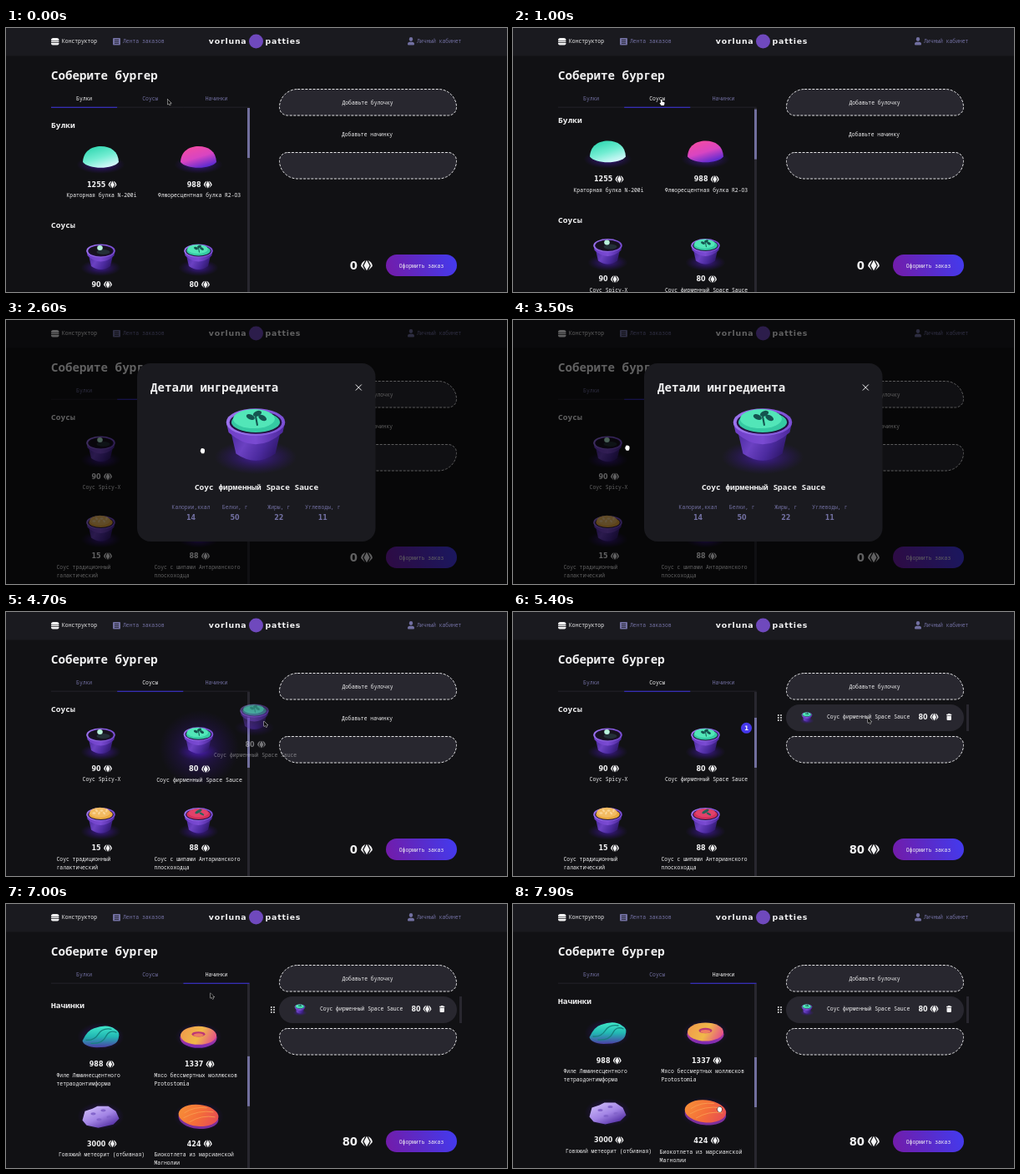
Write an HTML page with a canvas that moves like this. It is 600x317 px and loops after 8000 ms.

```html
<!DOCTYPE html>
<html lang="ru">
<meta charset="utf-8">
<title>Конструктор</title>
<style>
html, body { margin: 0; width: 600px; height: 317px; overflow: hidden; background: #111114 }
canvas { display: block }
</style>
<canvas id="stage" width="600" height="317"></canvas>
<script>
const c = document.getElementById('stage').getContext('2d');
const MONO = '"Noto Sans Mono", "DejaVu Sans Mono", monospace';
const WIDE = '"DejaVu Sans", sans-serif';
const WHITE = '#f2f2f3', MUTED = '#7270a2', PANEL = '#28272f', BLUE = '#4338ea';
const LOOP = 8000, OPEN = 2350, CLOSE = 3600, GRAB = 4350, DROP = 5300;
const TAB_2 = 930, TAB_3 = 6450;

const ease = (t, a, b) => {
  const k = Math.min(1, Math.max(0, (t - a) / (b - a)));
  return k * k * (3 - 2 * k);
};
const isDragging = t => t >= GRAB && t < DROP;
const isModal = t => t >= OPEN && t < CLOSE;
const scrollAt = t => 120 * ease(t, TAB_2, TAB_2 + 500) + 221 * ease(t, TAB_3, TAB_3 + 600);

// Drawing helpers
function text(s, x, y, { size = 6.37, color = WHITE, align = 'left', weight = 500, face = MONO, gap = 0 } = {}) {
  c.font = `${weight} ${size}px ${face}`;
  c.letterSpacing = `${gap}px`;
  c.fillStyle = color;
  c.textAlign = align;
  c.fillText(s, x, y + size * .355);
}
const digits = (s, x, y, o) => text(s, x, y, { size: 8, weight: 700, face: WIDE, ...o });

function fill(d, color) {
  c.fillStyle = color;
  c.fill(new Path2D(d));
}
function line(d, color, width = 1) {
  c.strokeStyle = color;
  c.lineWidth = width;
  c.stroke(new Path2D(d));
}
function oval(x, y, rx, ry, color, turn = 0) {
  c.beginPath();
  c.ellipse(x, y, rx, ry, turn, 0, 7);
  c.fillStyle = color;
  c.fill();
}
function box(x, y, w, h, r, color) {
  c.beginPath();
  c.roundRect(x, y, w, h, r);
  c.fillStyle = color;
  c.fill();
}
function ramp(x0, y0, x1, y1, ...colors) {
  const g = c.createLinearGradient(x0, y0, x1, y1);
  colors.forEach((k, i) => g.addColorStop(i / (colors.length - 1), k));
  return g;
}
function at(x, y, s, paint) {
  c.save();
  c.translate(x, y);
  c.scale(s, s);
  paint();
  c.restore();
}
function glow(y, rx, ry, alpha) {
  c.save();
  c.translate(0, y);
  c.scale(rx, ry);
  const g = c.createRadialGradient(0, 0, 0, 0, 0, 1);
  g.addColorStop(0, `rgba(92,35,225,${alpha})`);
  g.addColorStop(.5, `rgba(75,25,190,${alpha * .5})`);
  g.addColorStop(1, 'rgba(60,20,160,0)');
  oval(0, 0, 1, 1, g);
  c.restore();
}
const gem = (x, y, s = 1) => at(x, y, s, () => {
  fill('M0-4.5L2.5.2 0 4.4-2.5.2Z', WHITE);
  for (const side of [-1, 1]) {
    c.save();
    c.scale(side, 1);
    fill('M1.2-4.3Q4.6-3 4.9.8L1.5 4.3 3.5.2Z', WHITE);
    c.restore();
  }
});

// Food pictures, centred on the origin
const cup = (sauce, deco) => () => {
  glow(13, 24, 10, .65);
  fill('M-15-4L-11.5 11Q0 19 11.5 11L15-4Z', ramp(-14, -2, 13, 13, '#4a2a9c', '#6b41c2', '#4b2a9e', '#29145f'));
  fill('M-17.2-7.5L-15.8-1.5Q0 12.5 15.8-1.5L17.2-7.5Z', ramp(-17, 0, 17, 0, '#6f3fc8', '#7a4bd2', '#4a2699'));
  oval(0, -7.5, 17.2, 8, ramp(-17, 0, 17, 0, '#9d74ee', '#7b4fd4'));
  oval(0, -7.3, 15.3, 6.7, '#21133f');
  oval(0, -7.5, 14.2, 6, sauce);
  deco();
};
const spaceCup = cup('#35c9a2', () => {
  oval(-1, -9.5, 12.2, 5.6, '#52e6b8');
  for (const [x, y, r] of [[-3, -10.5, .4], [1, -12.5, -.4], [4, -10, .5]]) oval(x, y, 2.6, 1.5, '#14544f', r);
  line('M0-11L1-5.5', '#14544f', 1);
});
const darkCup = cup('#17121f', () => {
  oval(3, -6, 8, 3, '#243038');
  oval(-1, -11, 3.3, 3, '#b9f2dc');
});
const goldCup = cup('#e9a83e', () => {
  oval(-1, -9.8, 12.2, 6, '#f2bb62');
  for (let i = 0; i < 6; i++) oval(-8 + i * 3, -9 - 3 * (i % 2), 2, 1.2, '#fad596', i);
});
const redCup = cup('#d22f5b', () => {
  oval(0, -9.3, 11.8, 5.2, '#e2426a');
  oval(0, -11, 4.5, 1.7, '#27645a', -.5);
  oval(4, -8, 3, 1.2, '#27645a', .5);
});
const bun = (...colors) => () => {
  glow(9, 29, 11, .65);
  fill('M-21.5 6C-21-7-11-13 0-13C12-13 21-7 21.5 6C15 15-15 15-21.5 6Z', ramp(-4, -13, 4, 13, ...colors));
};
const fillet = () => {
  glow(0, 28, 17, .55);
  fill('M-22 5Q-16-8-8-10Q8-16 17-9Q24-6 21 3Q18 13-5 13Q-20 12-22 5Z', ramp(0, -13, 0, 13, '#41e8ca', '#22b7b3', '#4c3fa6'));
  line('M-18 4Q-8 5-3-3T13-9M-12 8Q2 9 6 0T19-5', '#15837f', 1.3);
};
const ring = () => {
  glow(0, 28, 17, .6);
  oval(0, 1.5, 22, 12, ramp(0, -10, 0, 14, '#e74c8f', '#7428b4'));
  oval(0, -1.5, 21.5, 11, ramp(-18, -10, 18, 10, '#f19c4c', '#f0b849', '#e4478f'));
  oval(0, -3, 8, 3.2, '#bb3775');
  oval(0, -2, 6, 2, '#ef7c62');
};
const meteor = () => {
  glow(0, 28, 17, .6);
  fill('M-22 5L-19-6-10-9-4-12 9-12 18-6 22 3 15 10-3 14-17 11Z', ramp(-6, -12, 6, 14, '#c5b0f5', '#a284e5', '#5935a9'));
  for (const [x, y] of [[-9, -3], [3, -7], [10, 1], [-2, 4]]) oval(x, y, 3, 1.6, '#8465cc');
};
const cutlet = () => {
  glow(0, 30, 18, .55);
  oval(0, 2.5, 24, 12.5, '#7c2f9b', .1);
  oval(0, -1, 24, 13, ramp(-20, -10, 20, 12, '#f78b37', '#f46d39', '#e64c55'), .1);
  line('M-17-4Q-5-12 10-10M-18 2Q0-8 18-5M-11 7Q4-2 20 1', '#f9a052', .8);
};

const LEFT = 114.5, RIGHT = 231.5;
// column, price row, price, picture, name, optional second line
const items = [
  [LEFT, 188, '1255', bun('#37d9b4', '#72edd2', '#d4f8fa'), 'Краторная булка N-200i'],
  [RIGHT, 188, '988', bun('#f04ba6', '#d845c2', '#5d2bd1'), 'Флюоресцентная булка R2-O3'],
  [LEFT, 308, '90', darkCup, 'Соус Spicy-X'],
  [RIGHT, 308, '80', spaceCup, 'Соус фирменный Space Sauce'],
  [LEFT, 403.5, '15', goldCup, 'Соус традиционный', 'галактический'],
  [RIGHT, 403.5, '88', redCup, 'Соус с шипами Антарианского', 'плоскоходца'],
  [LEFT, 529, '988', fillet, 'Филе Люминесцентного', 'тетраодонтимформа'],
  [RIGHT, 529, '1337', ring, 'Мясо бессмертных моллюсков', 'Protostomia'],
  [LEFT, 624.5, '3000', meteor, 'Говяжий метеорит (отбивная)'],
  [RIGHT, 624.5, '424', cutlet, 'Биокотлета из марсианской', 'Магнолии']
];
const dragged = items[3];

// Draws around the middle of the card
function card([, , price, picture, name, more]) {
  at(-1, -17, 1, picture);
  const start = -(price.length * 5.5 + 13) / 2;
  digits(price, start, 16);
  gem(start + price.length * 5.5 + 8.5, 16);
  if (more) {
    text(name, -54, 29);
    text(more, -54, 39);
  } else text(name, 0, 29, { align: 'center' });
}

// Pointer path: time, x, y
const path = [
  [0, 193.5, 85.5], [700, 177, 85.5], [1200, 177, 85.5], [1850, 235.5, 157], [2700, 235.5, 157],
  [3400, 137, 153.5], [3650, 137, 153.5], [4200, 242, 160], [GRAB, 242, 160], [4700, 309, 131],
  [5150, 425, 127], [5500, 425, 127], [6200, 244.5, 81], [6800, 244.5, 81], [7600, 247.5, 246.5], [LOOP, 247.5, 246.5]
];
function pointerAt(t) {
  const i = path.findIndex(p => p[0] > t);
  const [t0, x0, y0] = path[i - 1], [t1, x1, y1] = path[i];
  const k = ease(t, t0, t1);
  return [x0 + (x1 - x0) * k, y0 + (y1 - y0) * k];
}
function hoveredCard(t, [x, y]) {
  if (isDragging(t)) return dragged;
  if (isModal(t) || y < 96) return;
  return items.find(i => Math.abs(x - i[0]) < 56 && Math.abs(y + scrollAt(t) - i[1] + 16) < 46);
}

function header() {
  box(0, 0, 600, 33.5, 0, '#1a1a1f');
  box(54, 12, 9.5, 3, [3, 3, .5, .5], WHITE);
  box(54, 15.6, 9.5, 1.5, .7, WHITE);
  box(54, 17.8, 9.5, 2.7, [.5, .5, 2, 2], WHITE);
  text('Конструктор', 67, 16);
  box(128, 12, 9, 8.5, 1, MUTED);
  line('M130 14.2h5M130 16.3h5M130 18.4h5', '#1a1a1f', .8);
  text('Лента заказов', 140, 16, { color: MUTED });
  const logo = { size: 9.4, weight: 700, face: WIDE, gap: .8 };
  text('vorluna', 288.5, 15.5, { ...logo, align: 'right' });
  oval(299.5, 16, 8.5, 8.5, '#6f49bd');
  text('patties', 310.5, 15.5, logo);
  oval(485, 13.5, 2.2, 2.4, MUTED);
  box(481, 16.7, 8, 3.8, [2.5, 2.5, 1, 1], MUTED);
  text('Личный кабинет', 492, 16, { color: MUTED });
}

function menu(t, p) {
  text('Соберите бургер', 54, 57, { size: 14.2, weight: 700 });
  const active = t < TAB_2 ? 0 : t < TAB_3 ? 1 : 2;
  ['Булки', 'Соусы', 'Начинки'].forEach((name, i) => {
    const x = 54 + i * 79.2, mid = x + 39.6;
    const hover = Math.abs(p[0] - mid) < 14 && Math.abs(p[1] - 84) < 5;
    text(name, mid, 85, { align: 'center', color: i === active || hover ? WHITE : MUTED });
    box(x, 94.7, 79.2, i === active ? 1.1 : .8, 0, i === active ? BLUE : '#2a2931');
  });

  const scroll = scrollAt(t), hovered = hoveredCard(t, p);
  c.save();
  c.beginPath();
  c.rect(48, 96, 244, 221);
  c.clip();
  c.translate(0, -scroll);
  [['Булки', 117], ['Соусы', 237], ['Начинки', 458]].forEach(([s, y]) => text(s, 54, y, { size: 9.55, weight: 700 }));
  for (const item of items) {
    at(item[0], item[1] - 16, item === hovered ? 1.035 : 1, () => {
      if (item === dragged && isDragging(t)) glow(-8, 46, 44, .42);
      card(item);
    });
  }
  if (t >= DROP) {
    oval(279.5, 259.3, 6.5, 6.5, '#4538ec');
    digits('1', 279.5, 259.3, { align: 'center', size: 7.5 });
  }
  c.restore();
  box(289, 96, 3, 221, 0, PANEL);
  box(289, 96 + scroll * .258, 3, 60, 0, '#716f9d');
}

function slot(y, radii) {
  box(327.5, y, 212, 31.5, radii, PANEL);
  c.setLineDash([3, 1.6]);
  c.strokeStyle = '#e4e4e6';
  c.lineWidth = 1;
  c.stroke();
  c.setLineDash([]);
}

function order(t) {
  const added = t >= DROP;
  slot(73.5, [22, 22, 10, 10]);
  text('Добавьте булочку', 433, 89.5, { align: 'center' });
  slot(149.5, [10, 10, 22, 22]);
  if (added) {
    for (let i = 0; i < 6; i++) oval(317.8 + i % 2 * 3.2, 124 + (i >> 1) * 3, .9, .9, WHITE);
    box(327, 111, 213, 32, 16, PANEL);
    at(352, 126, .36, spaceCup);
    text('Соус фирменный Space Sauce', 376, 126);
    digits('80', 485.5, 126);
    gem(504.5, 126);
    box(519, 122.8, 6.4, 1.2, .4, WHITE);
    box(520.8, 122, 2.8, 1, .3, WHITE);
    box(519.5, 124.5, 5.4, 5.5, [0, 0, 1, 1], WHITE);
    box(543, 111, 3, 32, 0, PANEL);
  } else text('Добавьте начинку', 432.5, 127.5, { align: 'center' });

  digits(added ? '80' : '0', 421, 285, { size: 13.2, align: 'right' });
  gem(432, 285, 1.4);
  box(455, 272, 85, 26, 13, ramp(455, 298, 540, 272, '#741ba8', '#5a2bc9', '#423bf0'));
  text('Оформить заказ', 497.5, 285.3, { align: 'center' });
}

function modal() {
  box(0, 0, 600, 317, 0, 'rgba(0,0,0,.6)');
  box(157, 52, 285.5, 214, 16, '#1a1a1f');
  text('Детали ингредиента', 173, 80.5, { size: 14.2, weight: 700 });
  line('M418.8 77.5l7 7m0-7l-7 7', WHITE, 1);
  at(299, 138, 2.05, spaceCup);
  text('Соус фирменный Space Sauce', 300, 200.5, { size: 9.5, weight: 700, align: 'center' });
  [['Калории,ккал', 14], ['Белки, г', 50], ['Жиры, г', 22], ['Углеводы, г', 11]].forEach(([name, n], i) => {
    const x = 221.5 + i * 52.6, look = { color: MUTED, align: 'center' };
    text(name, x, 225, look);
    digits(n, x, 237, look);
  });
}

const ARROW = 'M0 0V6.3L1.5 5 2.5 7.3 3.6 6.8 2.6 4.7H4.6Z';
const FINGER = 'M0 .8Q.8-.4 1.5.8V3L4 3.6Q4.8 4 4.4 5.5L3.7 7.5H.5L-1.4 4.8Q-1.2 3.8 0 4.5Z';
const PALM = 'M-2.2-1.5Q-1.6-3.2 0-2.8Q2-3.2 2.5-1.2V1L1.6 3.2H-1.2L-2.8.6Z';
function pointer(t, p) {
  const [x, y] = p;
  const overTab = y < 92 && (Math.abs(x - 173) < 12 || Math.abs(x - 252) < 14);
  const onCard = isModal(t) || hoveredCard(t, p);
  const shape = isDragging(t) ? ARROW : overTab ? FINGER : onCard ? PALM : ARROW;
  at(x, y, 1, () => {
    line(shape, shape === ARROW ? '#d8d8d8' : '#222', 1);
    fill(shape, shape === ARROW ? '#111' : '#fff');
  });
}

function draw(t) {
  const p = pointerAt(t);
  box(0, 0, 600, 317, 0, '#111114');
  header();
  menu(t, p);
  order(t);
  if (isDragging(t)) {
    c.globalAlpha = .45;
    at(p[0] - 10.5, p[1] + 12, 1, () => card(dragged));
    c.globalAlpha = 1;
  }
  if (isModal(t)) modal();
  pointer(t, p);
}

let start;
requestAnimationFrame(function tick(now) {
  start ??= now;
  draw((now - start) % LOOP);
  requestAnimationFrame(tick);
});
</script>
</html>
```
